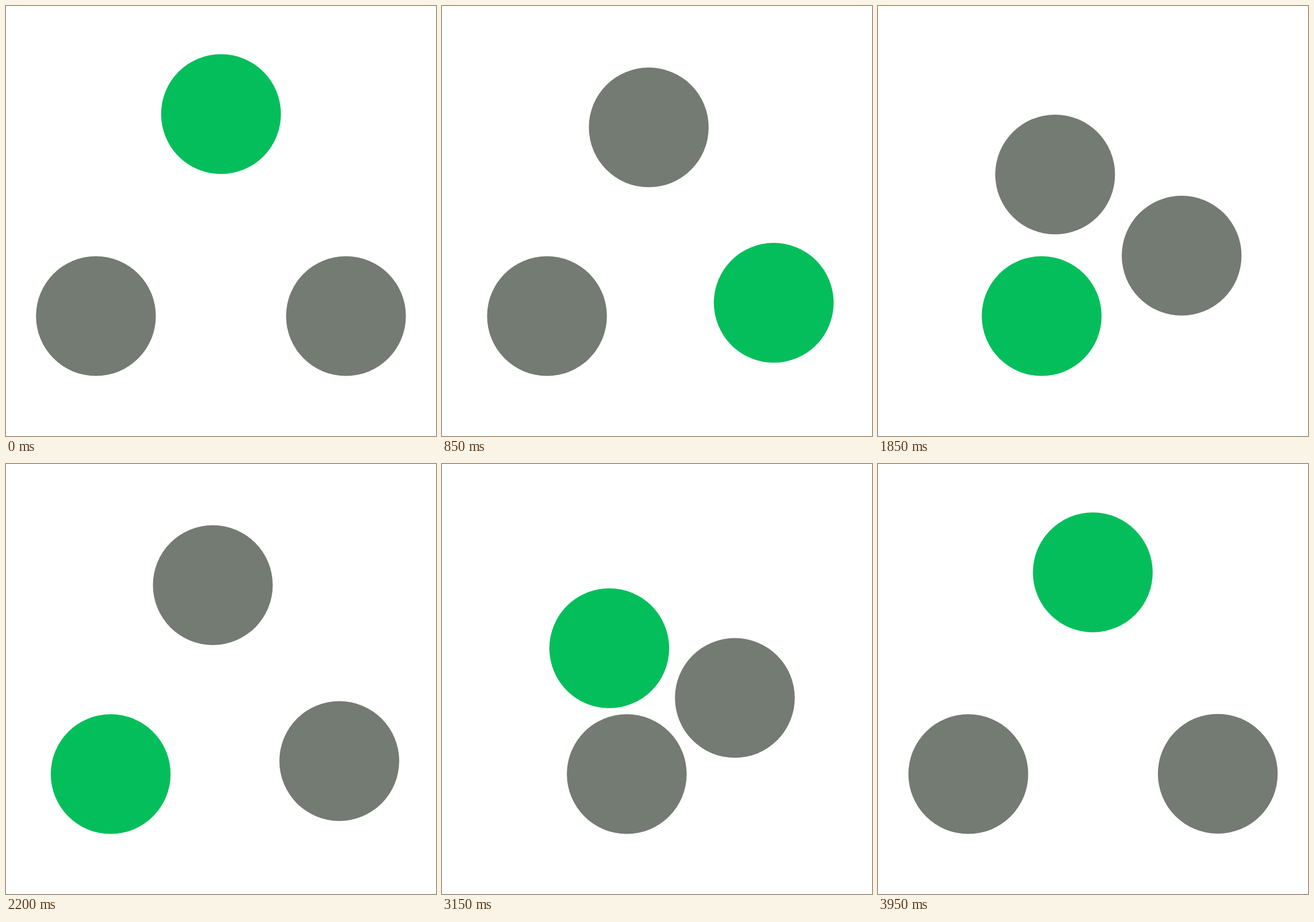
These frames come from a looping animation (748 by 748 pixels, 4 s). An HTML page:

```html
<!DOCTYPE html>
<html lang="en">
<head>
<meta charset="utf-8">
<title>Three dots</title>
<style>
  html, body { margin: 0; height: 100%; overflow: hidden; background: #fff; }
  svg { display: block; width: 100%; height: 100%; }
  circle { fill: #747b72; }
  #lead { fill: #03be5b; }
</style>
</head>
<body>
<svg viewBox="0 0 748 748">
  <circle r="104.2"/>
  <circle r="104.2"/>
  <circle r="104.2" id="lead"/>
</svg>
<script>
const LOOP = 4000, STEP = 50;
const STOPS = [0, 0.33, 0.67, 1];
const TOP = [374, 188], LOW = 539.4;

// Stations each dot visits, clockwise.
const routes = [
  [[156.4, LOW], TOP, [594, LOW]],
  [[591.4, LOW], [153.8, LOW], TOP],
  [TOP, [591.4, LOW], [153.8, LOW]]
];
const dots = document.querySelectorAll('circle');

const bez = (a, b, t) => 3 * a * t * (1 - t) ** 2 + 3 * b * t * t * (1 - t) + t ** 3;

// Cubic-bezier easing, solved by bisection.
function ease(u) {
  let lo = 0, hi = 1;
  for (let i = 0; i < 24; i++) {
    const mid = (lo + hi) / 2;
    if (bez(0.52, 0.03, mid) < u) lo = mid; else hi = mid;
  }
  return bez(0.15, 0.97, (lo + hi) / 2);
}

function draw(ms) {
  const tick = Math.floor((ms + 8) / STEP) * STEP;
  const phase = (tick % LOOP) / LOOP;
  const leg = phase < STOPS[1] ? 0 : phase < STOPS[2] ? 1 : 2;
  const p = ease((phase - STOPS[leg]) / (STOPS[leg + 1] - STOPS[leg]));
  routes.forEach((route, i) => {
    const from = route[leg], to = route[(leg + 1) % 3];
    dots[i].setAttribute('cx', from[0] + (to[0] - from[0]) * p);
    dots[i].setAttribute('cy', from[1] + (to[1] - from[1]) * p);
  });
}

function frame(now) {
  draw(now);
  requestAnimationFrame(frame);
}
draw(0);
requestAnimationFrame(frame);
</script>
</body>
</html>
```
